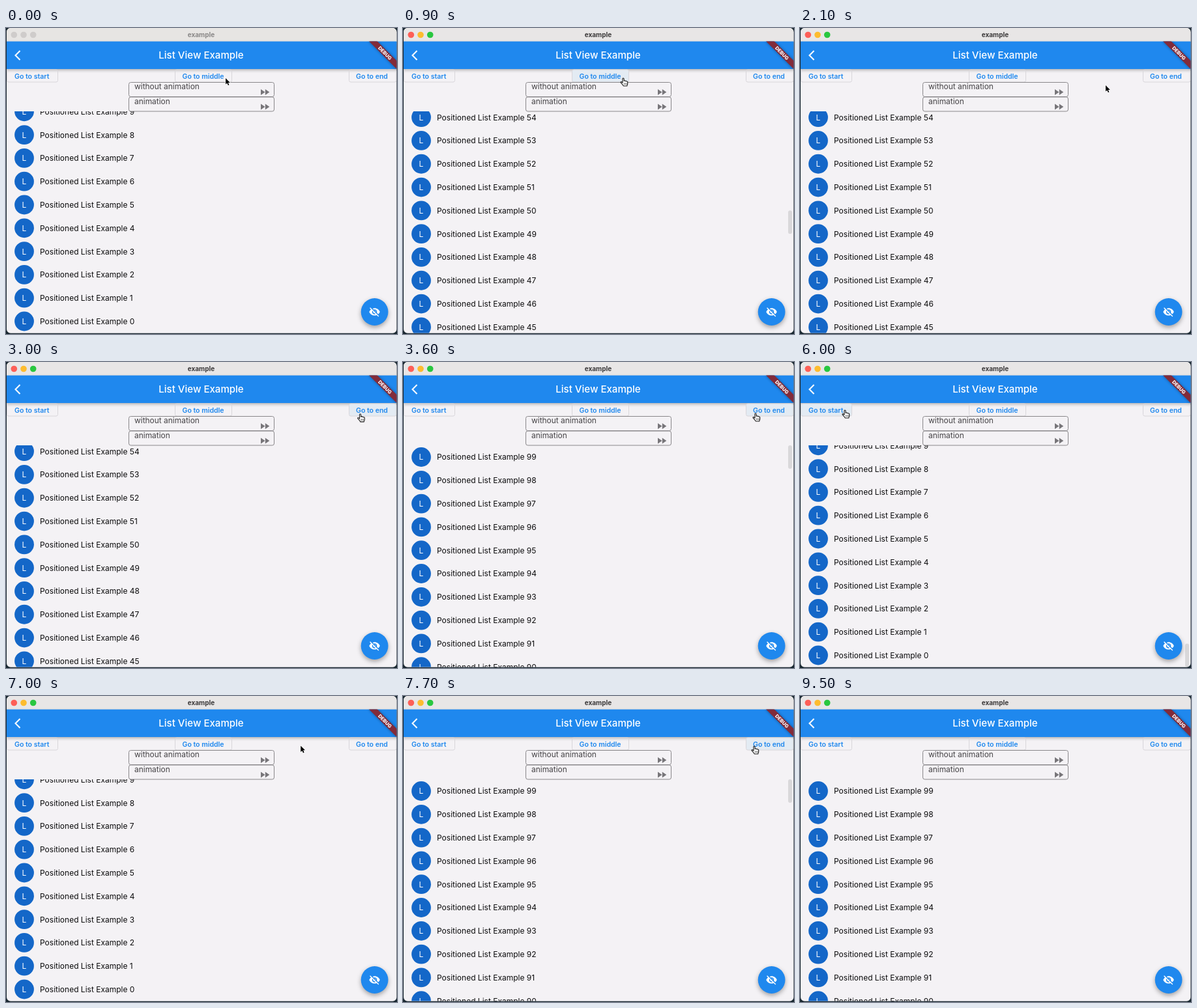
These frames come from a looping animation (600 px wide and 470 px high, 9.6 s). An HTML page with a canvas:

```html
<!DOCTYPE html>
<html lang="en">
<head>
<meta charset="utf-8">
<title>example</title>
<style>
html, body { margin: 0; width: 100%; height: 100%; overflow: hidden; background: #17262f; }
canvas { display: block; }
</style>
</head>
<body>
<canvas id="stage" width="600" height="470"></canvas>
<script>
const ctx = document.getElementById('stage').getContext('2d');
const LOOP = 9600, STEP = 100;
const BLUE = '#1f88ee', AVATAR = '#1467c8', PAGE = '#f4f2f5';
const ROW = 35.8, LIST_TOP = 128, LIST_BOTTOM = 468.8, MAX_SCROLL = 3239.7;
const BAR_TOP = 20.6, BAR_BOTTOM = 63;
const ACTIVATE = 300;

const buttons = [
  { label: 'Go to start', x: 1, w: 79, textX: 13 },
  { label: 'Go to middle', x: 259, w: 88, textX: 270.5 },
  { label: 'Go to end', x: 526, w: 73.5, textX: 537 }
];

// Each jump sets the list position as a share of its full scroll range.
const jumps = [
  { at: 700, pos: 0.5 },
  { at: 3200, pos: 0 },
  { at: 4500, pos: 0.5 },
  { at: 5700, pos: 1 },
  { at: 7500, pos: 0 }
];

// Pointer path: time, x, y
const pointerPath = [
  [0, 337, 77], [1500, 337, 77], [2100, 469, 88], [2800, 543, 80],
  [3600, 540, 79], [3800, 540, 79], [4400, 323, 72], [4800, 323, 72],
  [5500, 68, 74], [6200, 68, 74], [7300, 538, 77], [8200, 538, 77],
  [9000, 625, 150], [LOOP, 625, 150]
];

const eyeOff = new Path2D('M12 7c2.76 0 5 2.24 5 5 0 .65-.13 1.26-.36 1.83l2.92 2.92c1.51-1.26 2.7-2.89 3.43-4.75-1.73-4.39-6-7.5-11-7.5-1.4 0-2.74.25-3.98.7l2.16 2.16C10.74 7.13 11.35 7 12 7z' +
  'M2 4.27l2.28 2.28.46.46C3.08 8.3 1.78 10.02 1 12c1.73 4.39 6 7.5 11 7.5 1.55 0 3.03-.3 4.38-.84l.42.42L19.73 22 21 20.73 3.27 3 2 4.27z' +
  'M7.53 9.8l1.55 1.55c-.05.21-.08.43-.08.65 0 1.66 1.34 3 3 3 .22 0 .44-.03.65-.08l1.55 1.55c-.67.33-1.41.53-2.2.53-2.76 0-5-2.24-5-5 0-.79.2-1.53.53-2.2z' +
  'm4.31-.78l3.15 3.15.02-.16c0-1.66-1.34-3-3-3l-.17.01z');
const arrow = new Path2D('M0 0V9.6L2.2 7.5 3.8 11.1 5.4 10.4 3.9 6.9H6.9Z');
const hand = new Path2D('M0 1.1C0-.4 2-.4 2.1 1.1V4.3C2.7 3.5 4 3.7 4.2 4.6 4.9 4 5.9 4.3 6.1 5.1 7 4.7 7.7 5.2 7.7 6.2V8.6C7.7 10 6.8 10.6 6.8 12H1.2C1 10.4-1.5 8.7-2.8 6.9-3.4 5.9-2.2 5.2-1.3 6L0 7.2Z');

function text(str, x, y, size, color, weight = 400, align = 'left') {
  ctx.font = `${weight} ${size}px Inter, sans-serif`;
  ctx.textAlign = align;
  ctx.fillStyle = color;
  ctx.fillText(str, x, y);
}

function disc(x, y, r, color) {
  ctx.fillStyle = color;
  ctx.beginPath();
  ctx.arc(x, y, r, 0, Math.PI * 2);
  ctx.fill();
}

function box(x, y, w, h, r, fill, stroke) {
  ctx.beginPath();
  ctx.roundRect(x, y, w, h, r);
  if (fill) { ctx.fillStyle = fill; ctx.fill(); }
  if (stroke) { ctx.strokeStyle = stroke; ctx.lineWidth = 1; ctx.stroke(); }
}

function shadow(color, blur, y) {
  ctx.shadowColor = color;
  ctx.shadowBlur = blur;
  ctx.shadowOffsetY = y;
}

function pointerAt(t) {
  const i = pointerPath.findIndex(p => p[0] > t);
  const [t0, x0, y0] = pointerPath[i - 1], [t1, x1, y1] = pointerPath[i];
  const u = (t - t0) / (t1 - t0), k = u * u * (3 - 2 * u);
  return { x: x0 + (x1 - x0) * k, y: y0 + (y1 - y0) * k };
}

function listAt(t) {
  const last = jumps.filter(j => j.at <= t).pop();
  if (!last) return { pos: 1, bar: 0 };
  return { pos: last.pos, bar: Math.max(0, Math.min(1, (1000 - (t - last.at)) / 300)) };
}

function drawList({ pos, bar }) {
  ctx.save();
  ctx.beginPath();
  ctx.rect(0, LIST_TOP, 600, LIST_BOTTOM - LIST_TOP);
  ctx.clip();
  for (let n = 99; n >= 0; n--) {
    const y = 146 + (99 - n) * ROW - pos * MAX_SCROLL;
    if (y < LIST_TOP - 20 || y > LIST_BOTTOM + 20) continue;
    disc(28, y, 14.9, AVATAR);
    text('L', 28, y + 4.4, 12, '#fff', 400, 'center');
    text(`Positioned List Example ${n}`, 52, y + 4.4, 12, '#0c0c0d');
  }
  ctx.restore();
  if (bar) box(591, 128 + pos * 304.5, 6, 36, 3, `rgba(0,0,0,${0.11 * bar})`);
}

function drawTitleBar(active) {
  ctx.fillStyle = active ? '#e8e6e6' : '#e7e5e3';
  ctx.fillRect(0, 0, 600, 21);
  const lights = active ? ['#fd5f57', '#fdbc2f', '#29c740'] : Array(3).fill('#cfcccb');
  lights.forEach((color, i) => disc(12.3 + i * 14.7, 10.5, 4.8, color));
  text('example', 299.5, 13.8, 10, active ? '#3b393a' : '#898787', 700, 'center');
}

function drawBanner() {
  ctx.save();
  ctx.beginPath();
  ctx.rect(0, BAR_TOP, 600, 448);
  ctx.clip();
  ctx.translate(599.5, BAR_TOP);
  ctx.rotate(Math.PI / 4);
  shadow('rgba(0,0,0,.4)', 4, 0);
  ctx.fillStyle = '#822b3a';
  ctx.fillRect(-30, 20.9, 60, 9);
  shadow('transparent', 0, 0);
  text('DEBUG', 0, 28.1, 7.5, '#fff', 800, 'center');
  ctx.restore();
}

function drawAppBar() {
  ctx.save();
  shadow('rgba(0,0,0,.32)', 5, 2);
  ctx.fillStyle = BLUE;
  ctx.fillRect(0, BAR_TOP, 600, BAR_BOTTOM - BAR_TOP);
  ctx.restore();
  ctx.strokeStyle = '#fff';
  ctx.lineWidth = 2.1;
  ctx.beginPath();
  ctx.moveTo(21.5, 35);
  ctx.lineTo(14.5, 42);
  ctx.lineTo(21.5, 49);
  ctx.stroke();
  text('List View Example', 299.5, 47.2, 15.05, '#fff', 500, 'center');
}

function drawDropdown(label, y) {
  box(188.5, y, 223, 22, 3, null, '#89878a');
  text(label, 197, y + 10.8, 11.95, '#454346');
  ctx.fillStyle = '#777579';
  for (const x of [391, 397.8]) {
    ctx.beginPath();
    ctx.moveTo(x, y + 10.5);
    ctx.lineTo(x + 6.5, y + 15);
    ctx.lineTo(x, y + 19.5);
    ctx.fill();
  }
}

function drawFab() {
  ctx.save();
  shadow('rgba(0,0,0,.34)', 7, 3);
  disc(565.6, 436, 20.9, BLUE);
  ctx.restore();
  ctx.save();
  ctx.translate(556.6, 427);
  ctx.scale(0.746, 0.746);
  ctx.fillStyle = '#fff';
  ctx.fill(eyeOff);
  ctx.restore();
}

function drawArrow() {
  ctx.lineWidth = 1.4;
  ctx.strokeStyle = '#fff';
  ctx.fillStyle = '#000';
  ctx.stroke(arrow);
  ctx.fill(arrow);
}

function drawHand() {
  ctx.lineWidth = 1.1;
  ctx.strokeStyle = '#1a1a1a';
  ctx.fillStyle = '#fff';
  ctx.fill(hand);
  ctx.stroke(hand);
  ctx.fillStyle = '#333';
  for (const x of [2.1, 3.9, 5.7]) ctx.fillRect(x, 7.4, 0.7, 2.8);
}

function drawPointer({ x, y }, isHand) {
  ctx.save();
  ctx.translate(x, y);
  ctx.lineJoin = 'round';
  if (isHand) drawHand(); else drawArrow();
  ctx.restore();
}

function draw(t) {
  const active = t >= ACTIVATE;
  const pointer = pointerAt(t);
  const hovered = active && buttons.find(b =>
    pointer.x >= b.x && pointer.x <= b.x + b.w && pointer.y >= 64 && pointer.y <= 83);

  ctx.fillStyle = '#17262f';
  ctx.fillRect(0, 0, 600, 470);
  ctx.save();
  ctx.beginPath();
  ctx.roundRect(1, 0, 598.4, LIST_BOTTOM, 6);
  ctx.clip();
  ctx.fillStyle = PAGE;
  ctx.fillRect(0, 0, 600, 470);
  drawList(listAt(t));
  drawTitleBar(active);
  drawAppBar();
  for (const b of buttons) {
    box(b.x + 0.5, 64, b.w - 1, 19, 2.5, b === hovered ? '#e3ebf3' : null, '#d8d6da');
    text(b.label, b.textX, 77.6, 10.55, BLUE, 600);
  }
  drawDropdown('without animation', 83.5);
  drawDropdown('animation', 106);
  drawFab();
  drawBanner();
  ctx.restore();
  drawPointer(pointer, Boolean(hovered));
}

const start = performance.now();
function frame() {
  const t = (performance.now() - start) % LOOP;
  draw(Math.floor(t / STEP) * STEP);
  requestAnimationFrame(frame);
}
frame();
</script>
</body>
</html>
```
